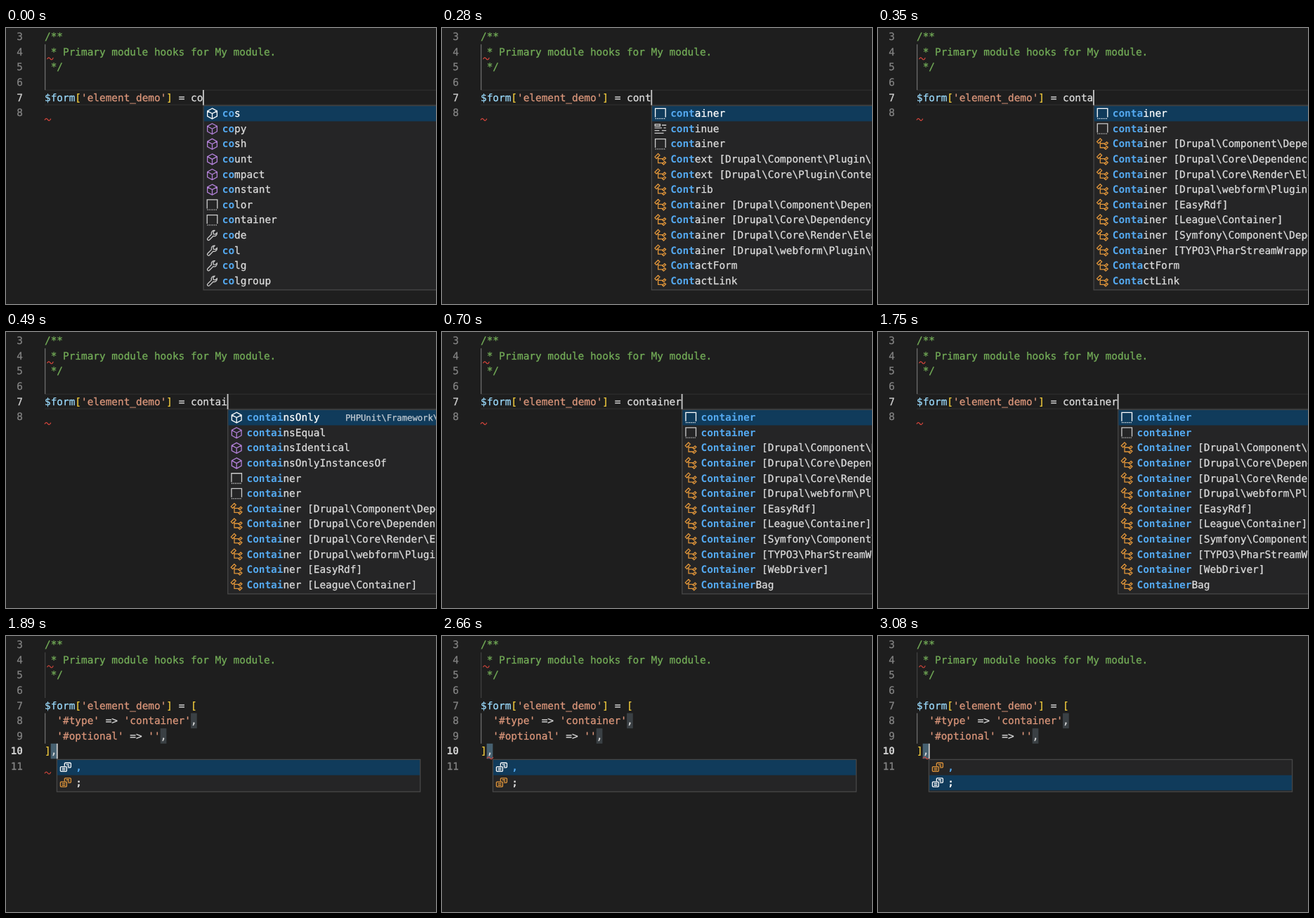
Recreate the animation shown at these times as an HTML page. Size 612x392 px, loop 3.22 s.

```html
<!DOCTYPE html>
<html lang="en">
<head>
<meta charset="utf-8">
<title>Editor autocomplete</title>
<style>
html, body { margin: 0; width: 100%; height: 100%; overflow: hidden; background: #1e1e1e; }
svg { display: block; }
text { font: 14.4px "DejaVu Sans Mono", monospace; white-space: pre; text-rendering: geometricPrecision; stroke-width: 0.25; }
.bold { font-weight: bold; stroke-width: 0; }
.icon { fill: none; stroke-width: 1.25; }
.squiggle { fill: none; stroke-width: 1.2; }
</style>
</head>
<body>
<svg id="stage" width="612" height="392" viewBox="0 0 612 392"></svg>
<script>
const LOOP = 3220, CH = 8.669, LH = 21.6, LEFT = 55;
const stage = document.getElementById('stage');
const color = {
  text: '#dedede', comment: '#74ae58', variable: '#9cdcfe', bracket: '#f5cf3d',
  string: '#dc977b', match: '#54a9f0', number: '#858585', selected: '#103b5b',
  panel: '#252526', border: '#474747', cursor: '#c8c8c8'
};

const icons = {
  method: ['#b180d7', 'M8 .8 14.6 4.4V11.6L8 15.2 1.4 11.6V4.4ZM1.4 4.4 8 8 14.6 4.4M8 8V15.2'],
  snippet: ['#cccccc', 'M1 13V1H15V13M1 14.7h1.2m1.2 0h1.2m1.2 0h1.2m1.2 0h1.2m1.2 0h1.2m1.2 0h1.2'],
  property: ['#cccccc', 'M11.3 1.4A4 4 0 0 0 7 6.7L1.7 12A1.7 1.7 0 0 0 4.1 14.4L9.4 9A4 4 0 0 0 14.6 4.6L12.3 6.6 9.7 6.3 9.4 3.7Z'],
  type: ['#e0953a', 'M.4 4.8 4.8 .4 7.1 2.6 2.6 7.1ZM4.9 5V13H11.2M4.9 7.2H11.2M10.8 8 13.7 5.1 15.4 6.6 12.4 9.4ZM10.8 13.9 13.7 10.9 15.4 12.4 12.4 15.3Z'],
  keyword: ['#cccccc', 'M10 3h6M12.5 6.8h3M0 6.8h10M0 14h12.5M0 10.4h6.5M10 10.4h6M.6 1.6h7v2.6h-7z'],
  member: ['#e0953a', 'M6.5 6V2.5L7.3 1.7H14.4L15.2 2.5V7.2L14.4 8H11M8.8 4h4M10.5 6h2.5M1.6 6.8H8.6L9.4 7.6V12.6L8.6 13.4H1.6L.8 12.6V7.6ZM3 9h4.5M3 11.2h4.5']
};

const list = (kind, ...names) => names.map(name => ({ kind, name }));
const snippets = list('snippet', 'container', 'container');
const services = list('type',
  String.raw`Container [Drupal\Component\DependencyInjection]`,
  String.raw`Container [Drupal\Core\DependencyInjection]`,
  String.raw`Container [Drupal\Core\Render\Element]`,
  String.raw`Container [Drupal\webform\Plugin\WebformElement]`);
const vendors = list('type', 'Container [EasyRdf]', String.raw`Container [League\Container]`);
const others = list('type',
  String.raw`Container [Symfony\Component\DependencyInjection]`,
  String.raw`Container [TYPO3\PharStreamWrapper]`,
  'Container [WebDriver]', 'ContainerBag');
const contacts = list('type', 'ContactForm', 'ContactLink');
const contexts = list('type',
  String.raw`Context [Drupal\Component\Plugin\Context]`,
  String.raw`Context [Drupal\Core\Plugin\Context]`, 'Contrib');
const keyword = list('keyword', 'continue');
const methods = list('method', 'containsOnly', 'containsEqual', 'containsIdentical', 'containsOnlyInstancesOf');
methods[0].detail = String.raw`PHPUnit\Framework\Assert`;

const cont = [snippets[0], ...keyword, snippets[1], ...contexts, ...services, ...contacts];
const contai = [...methods, ...snippets, ...services, ...vendors];
const container = [...snippets, ...services, ...vendors, ...others];
const typing = [
  [0, 'co', [...list('method', 'cos', 'copy', 'cosh', 'count', 'compact', 'constant'),
    ...list('snippet', 'color', 'container'), ...list('property', 'code', 'col', 'colg', 'colgroup')]],
  [70, 'con', [...list('method', 'constant'), ...cont.slice(0, 11)]],
  [210, 'cont', cont],
  [350, 'conta', [...snippets, ...services, ...vendors, ...others.slice(0, 2), ...contacts]],
  [490, 'contai', contai],
  [560, 'contain', contai],
  [630, 'containe', container],
  [700, 'container', container]
];

const esc = s => s.replace(/&/g, '&amp;').replace(/</g, '&lt;').replace(/>/g, '&gt;');
const lineTop = n => 88 + (n - 7) * LH;
const col = n => LEFT + n * CH;
const rect = (x, y, w, h, fill) => `<rect x="${x}" y="${y}" width="${w}" height="${h}" fill="${fill}"/>`;
const label = (x, y, runs, attrs = '') => `<text x="${x}" y="${y}" ${attrs}>` +
  runs.map(([s, ink, cls = '']) => `<tspan fill="${ink}" stroke="${ink}" class="${cls}">${esc(s)}</tspan>`).join('') + '</text>';
const code = (n, ...runs) => label(LEFT, lineTop(n) + 15.5, runs);
const cursor = (n, c) => rect(col(c) - 0.4, lineTop(n), 1.8, LH, color.cursor);
const guide = (from, to, fill) => rect(LEFT, lineTop(from), 1.3, (to - from) * LH, fill);

function squiggle(x, y, stroke) {
  return `<path class="squiggle" stroke="${stroke}" d="M${x} ${y + 1.2}q2.2 -4 4.4 -.6t4.4 -1.4"/>`;
}

function numbers(last, active) {
  let out = '';
  for (let n = 3; n <= last; n++) {
    const on = n === active;
    out += label(24, lineTop(n) + 15.5, [[String(n), on ? '#d2d2d2' : color.number, on && n > 9 ? 'bold' : '']], 'text-anchor="end"');
  }
  return out;
}

function popup(x, y, w, items, matched, selected) {
  const h = items.length * LH + 3.8;
  let out = rect(x, y, w, h, color.border) + rect(x + 1.3, y + 1.3, w - 2.6, h - 2.6, color.panel);
  items.forEach(({ kind, name, detail }, i) => {
    const top = y + 1.3 + i * LH, on = i === selected;
    const [tint, shape] = icons[kind];
    const ink = on ? '#ffffff' : color.text;
    if (on) out += rect(x + 1.3, top, w - 2.6, LH, color.selected);
    out += `<path class="icon" stroke="${on ? '#ffffff' : tint}" transform="translate(${x + 4.8} ${top + 2.4}) scale(1.04)" d="${shape}"/>`;
    const size = name === ';' ? 0 : matched;
    out += label(x + 27.4, top + 15.3, [
      [name.slice(0, size), color.match, 'bold'],
      [name.slice(size), ink, size ? '' : 'bold']
    ]);
    if (detail && on) out += label(483, top + 15, [[detail, '#c3ccd4']], 'style="font-size:12.2px"');
  });
  return out;
}

function header(red, tint) {
  return guide(4, 7, tint) +
    code(3, ['/**', color.comment]) +
    code(4, [' * Primary module hooks for My module.', color.comment]) +
    code(5, [' */', color.comment]) + squiggle(58.5, 43, red);
}

function assignment(tail, fill) {
  return code(7, ['$form', color.variable], ['[', color.bracket], ["'element_demo'", color.string],
    [']', color.bracket], [' = ', color.text], [tail, fill]);
}

function typingScene(word, items, blink) {
  const end = 24 + word.length, red = '#d8463c';
  return rect(LEFT, 87.6, 557, 1.5, '#2b2b2b') + rect(LEFT, 108.4, 557, 1.5, '#2b2b2b') +
    header(red, '#6c6c6c') + numbers(8, 7) + assignment(word, color.text) + squiggle(55, 129.6, red) +
    popup(col(end), 109.6, 640 - col(end), items, word.length, 0) +
    (blink ? cursor(7, end) : '');
}

function snippetScene(selected, checked, blink) {
  const red = '#c8443a', mark = '#3a4044';
  const box = (n, c, fill) => rect(col(c), lineTop(n), CH, LH, fill);
  return header(red, '#404040') + guide(8, 10, '#6c6c6c') + numbers(11, 10) +
    box(8, 24, mark) + box(9, 19, mark) + box(10, 1, '#466070') +
    assignment('[', color.bracket) +
    code(8, ["  '#type'", color.string], [' => ', color.text], ["'container'", color.string], [',', color.text]) +
    code(9, ["  '#optional'", color.string], [' => ', color.text], ["''", color.string], [',', color.text]) +
    code(10, [']', color.bracket], [',', color.text]) +
    (checked ? squiggle(64, 172.8, red) : squiggle(55, 194, red)) +
    popup(71.8, 174.8, 518.4, list('member', ',', ';'), 1, selected) +
    (blink ? cursor(10, 2) : '');
}

function scene(t) {
  if (t < 1890) {
    const [, word, items] = typing.filter(([start]) => start <= t).pop();
    return typingScene(word, items, t < 1260 || t >= 1750);
  }
  return snippetScene(t >= 3080 ? 1 : 0, t >= 2660, t < 2380 || t >= 2870);
}

let shown = '';
function draw(t) {
  const markup = scene(t);
  if (markup !== shown) stage.innerHTML = shown = markup;
}

const begin = performance.now();
function tick() {
  draw((performance.now() - begin) % LOOP);
  requestAnimationFrame(tick);
}
tick();
</script>
</body>
</html>
```
